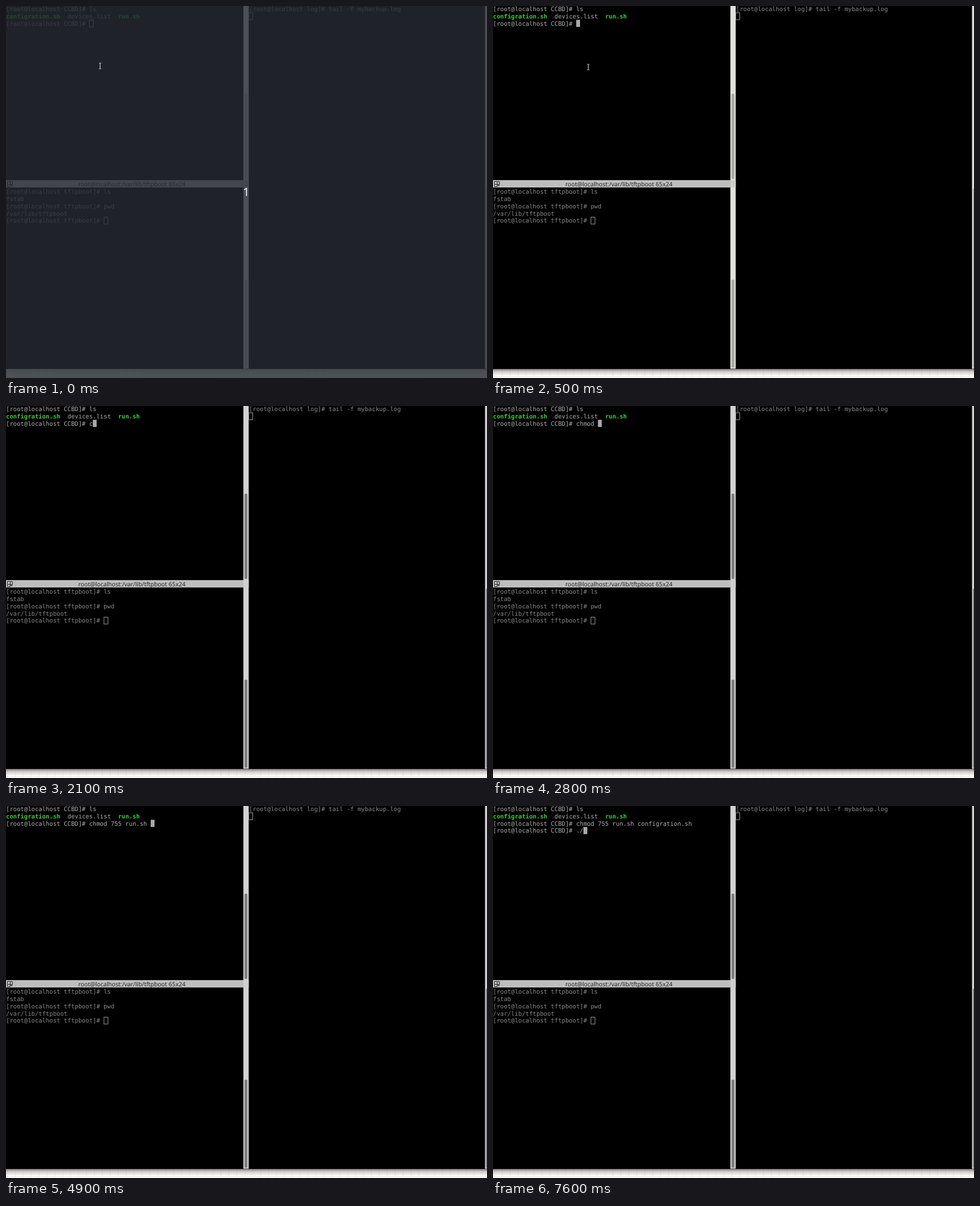
Recreate the animation shown at these times as an HTML page. Size 851 px wide and 658 px high, loop 8000 ms.

```html
<!DOCTYPE html>
<html lang="en">
<head>
<meta charset="utf-8">
<title>Terminal</title>
<style>
  html, body { margin: 0; width: 100%; height: 100%; overflow: hidden; background: #000; }
  svg { display: block; width: 851px; height: 658px; }
  text { white-space: pre; text-rendering: geometricPrecision; }
  .mono { font: 10.63px "DejaVu Sans Mono", monospace; fill: #8a8a8a; }
  .title { font: 10.6px "Open Sans", sans-serif; fill: #1c1c1c; }
  .count { font: 20px "Open Sans", sans-serif; fill: #fff; }
  .exec { font-weight: bold; fill: #2fb02f; }
  .box { fill: none; stroke: #9a9a9a; }
  .gutter { fill: #f2f2f0; }
  .thumb { fill: #d2d2d0; }
  .half .gutter { fill: #e0e0de; }
  .half .thumb { fill: #a8a8a7; }
  .focus .gutter { fill: #d2d2d1; }
  .focus .thumb { fill: #7d7d7d; }
  .half #shell .mono, .focus #shell .mono { fill: #b0b0b0; }
  .half #shell .exec, .focus #shell .exec { fill: #38d038; }
  #topThumb.late { fill: #a8a8a7; }
</style>
</head>
<body>
<svg id="stage" viewBox="0 0 851 658">
  <defs>
    <pattern id="weave" width="14" height="16" patternUnits="userSpaceOnUse">
      <rect width="14" height="16" fill="#fbfaf8"/>
      <path d="M2.5 0V16M0 15.5H14" stroke="#efeeeb"/>
    </pattern>
    <linearGradient id="fade" x2="0" y2="1">
      <stop stop-opacity=".5"/>
      <stop offset=".4" stop-opacity=".18"/>
      <stop offset="1" stop-opacity="0"/>
    </linearGradient>
  </defs>
  <rect width="851" height="642"/>
  <rect y="642" width="851" height="16" fill="url(#weave)"/>
  <rect id="shadow" y="642" width="851" height="12" fill="url(#fade)"/>

  <rect class="gutter" x="420" width="9.4" height="641.5"/>
  <rect class="gutter" x="847.5" width="3.5" height="641.5"/>
  <rect id="topThumb" class="thumb" x="422" y="155" width="5" height="151" rx="2"/>
  <rect class="thumb" x="422" y="484" width="5" height="156" rx="2"/>
  <rect class="thumb" x="849.3" y="323" width="3" height="317" rx="1"/>

  <rect y="308" width="420" height="13" fill="#bebebe"/>
  <rect id="corner" x="420" y="308" width="9.4" height="13" fill="#c2c2c2"/>
  <path d="M16.5 309V320" stroke="#adadad"/>
  <path d="M2.5 310.5H11.5V315.5H2.5ZM2.5 315.5V319.5H7.5V310.5M8.5 317.5H11.5M10 316V319" fill="none" stroke="#222"/>
  <text class="title" x="128" y="318.6">root@localhost:/var/lib/tftpboot 65x24</text>

  <g id="shell"></g>
  <g id="others"></g>
  <rect id="veil" width="851" height="658" fill="#272b32" opacity=".81"/>
  <path id="pointer" d="M-2 -5H-.5L0 -4.5L.5 -5H2M0 -4.5V4.5M-2 5H-.5L0 4.5L.5 5H2" fill="none" stroke="#e8e8e8"/>
  <text id="count" class="count" x="425" y="336" text-anchor="middle">1</text>
</svg>
<script>
const CELL = 6.4, ROW = 12.75, LOOP = 8000;
const $ = id => document.getElementById(id);

function add(parent, tag, attrs, text = '') {
  const el = document.createElementNS('http://www.w3.org/2000/svg', tag);
  for (const key in attrs) el.setAttribute(key, attrs[key]);
  el.textContent = text;
  return $(parent).appendChild(el);
}
const line = (parent, x, y, row, text, col = 0, cls = '') =>
  add(parent, 'text', { class: 'mono ' + cls, x: x + col * CELL, y: y + 9.2 + row * ROW }, text);
const box = (parent, x, y, row, col) =>
  add(parent, 'rect', { class: 'box', x: x + col * CELL + .5, y: y - .7 + row * ROW, width: 7, height: 12.2 });

const prompt = '[root@localhost CCBD]# ';
line('shell', 0, 0, 0, prompt + 'ls');
line('shell', 0, 0, 1, 'configration.sh', 0, 'exec');
line('shell', 0, 0, 1, 'devices.list', 17);
line('shell', 0, 0, 1, 'run.sh', 31, 'exec');
const command = line('shell', 0, 0, 2, prompt);
const next = line('shell', 0, 0, 3, '');
const hollow = box('shell', 0, 0, 2, 23);
const cursor = add('shell', 'rect', { width: CELL + .4, height: 12.6, fill: '#aaa' });

line('others', 430, 0, 0, '[root@localhost log]# tail -f mybackup.log');
box('others', 429, 0, 1, 0);
const lower = '[root@localhost tftpboot]# ';
[lower + 'ls', 'fstab', lower + 'pwd', '/var/lib/tftpboot', lower]
  .forEach((text, i) => line('others', 0, 323.2, i, text));
box('others', 0, 323.2, 4, 27);

// [time, characters typed so far]; each key press restarts the blink
const full = 'chmod 755 run.sh configration.sh ';
const keys = [[500, 0], [2100, 1], [2300, 2], [2500, 3], [2700, 4], [2800, 6], [3500, 7],
  [3700, 8], [3800, 9], [4100, 10], [4800, 12], [4900, 17], [6000, 18], [6100, 19], [6200, 33]];
const enter = [[6600, 0], [7400, 0], [7500, 1], [7600, 2]];

const show = (el, on) => el.setAttribute('visibility', on ? 'visible' : 'hidden');
const latest = (list, t) => list.filter(k => k[0] <= t).pop();

function draw(t) {
  const focused = t >= 500, entered = t >= 6600;
  $('stage').setAttribute('class', t < 500 ? '' : t < 600 ? 'half' : 'focus');
  $('topThumb').classList.toggle('late', t >= 600 && t < 800);
  $('topThumb').style.fill = t >= 600 && t < 800 ? '#a8a8a7' : '';
  $('corner').setAttribute('fill', focused ? '#cfcfce' : '#c2c2c2');
  $('shadow').setAttribute('opacity', focused ? 1 : .4);
  show($('veil'), t < 100);
  show($('count'), t < 100);
  show($('pointer'), t < 2100);
  $('pointer').setAttribute('transform', focused ? 'translate(168.5 108)' : 'translate(166.5 106)');

  const [since, typed] = latest(entered ? enter : keys, t) || [0, 0];
  command.textContent = prompt + full.slice(0, entered ? full.length : typed);
  next.textContent = entered ? prompt + './'.slice(0, typed) : '';
  show(hollow, !focused);
  show(cursor, focused && Math.floor((t - since) / 600) % 2 === 0);
  cursor.setAttribute('x', (prompt.length + typed) * CELL);
  cursor.setAttribute('y', (entered ? 3 : 2) * ROW - 1.1);
}

const start = performance.now();
function tick() {
  draw((performance.now() - start) % LOOP);
  requestAnimationFrame(tick);
}
tick();
</script>
</body>
</html>
```
